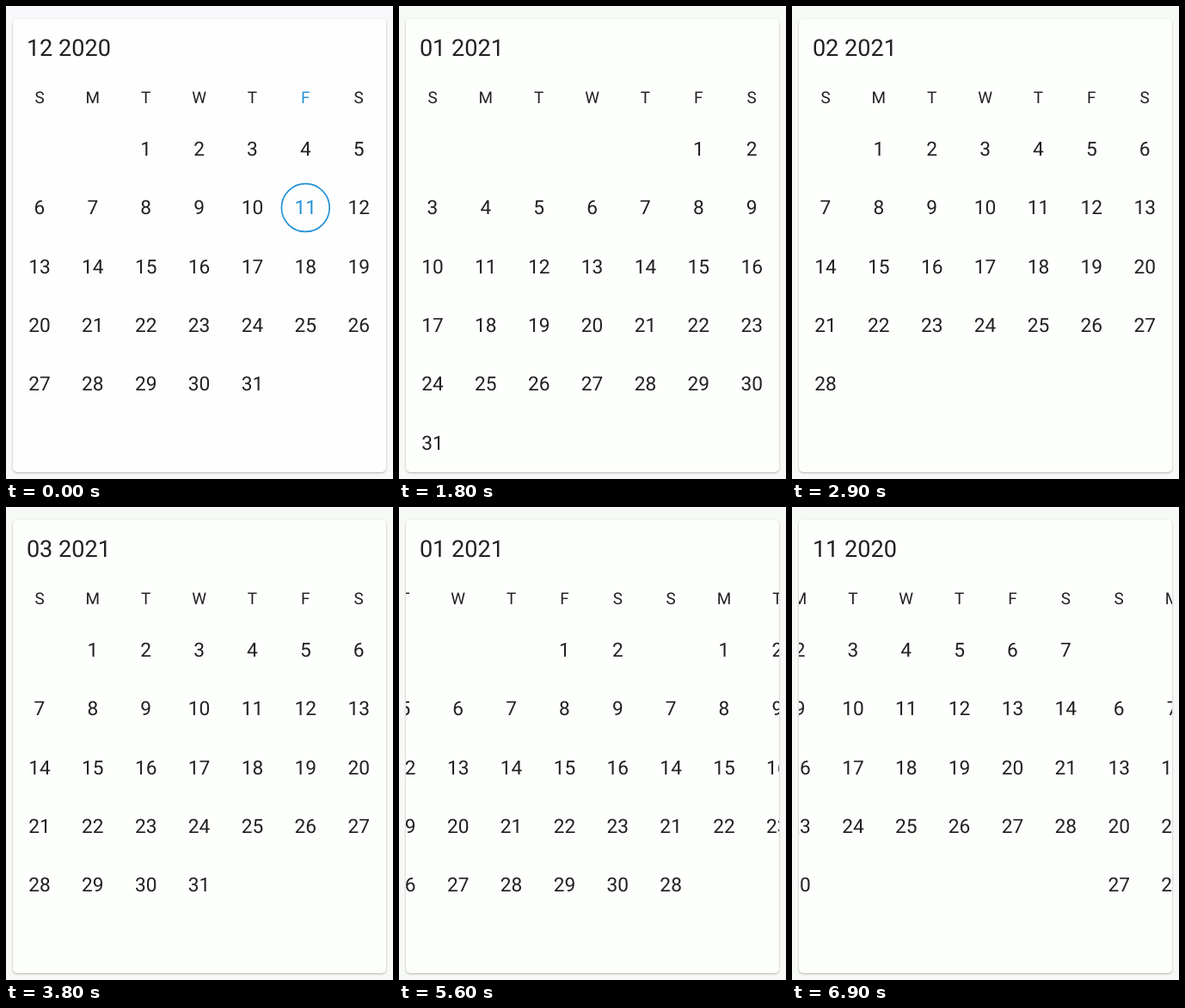
Animation of 450 by 550 pixels, one loop 7000 ms. Source, as an HTML page:

```html
<!DOCTYPE html>
<html lang="en">
<head>
<meta charset="utf-8">
<title>Month calendar</title>
<style>
  html, body { margin: 0; width: 100%; height: 100%; overflow: hidden; background: #f7f9f7; }
  svg { display: block; width: 450px; height: 550px; font-family: Roboto, sans-serif; fill: #212121; text-rendering: geometricPrecision; }
  .card { filter: drop-shadow(0 1px 1.2px rgba(0, 0, 0, .28)); }
  .title { font-size: 27.1px; }
  .head { font-size: 18.9px; text-anchor: middle; }
  .day { font-size: 22.7px; text-anchor: middle; }
  .today { fill: #2592d6; }
  .ring { fill: none; stroke: #2592d6; stroke-width: 1.7px; }
</style>
</head>
<body>
<svg id="stage" viewBox="0 0 450 550">
  <defs><clipPath id="clip"><rect x="8" y="15" width="434" height="527" rx="5"/></clipPath></defs>
  <rect id="back" width="450" height="550"/>
  <rect id="card" class="card" x="8" y="15" width="434" height="527" rx="5"/>
  <text id="title" class="title" x="23.9" y="58"></text>
  <g id="pages" clip-path="url(#clip)"></g>
</svg>
<script>
const $ = id => document.getElementById(id);
const LOOP = 7000, FRAME = 100;
const PAGE = 433, COL = PAGE / 7, ROW = 68.35;
const FIRST = { year: 2020, month: 10 };
const TODAY = { page: 1, day: 11, col: 5 };

// Swipes between page indexes; lead is how far into the move its first step is
const swipes = [
  { at: 1400, steps: 5, from: 1, to: 2, lead: 21 },
  { at: 2500, steps: 5, from: 2, to: 3, lead: 21 },
  { at: 3500, steps: 4, from: 3, to: 4, lead: 62 },
  { at: 4800, steps: 5, from: 4, to: 3, lead: 13 },
  { at: 5500, steps: 5, from: 3, to: 2, lead: 21 },
  { at: 6200, steps: 5, from: 2, to: 1, lead: 21 },
  { at: 6800, steps: 4, from: 1, to: 0, lead: 62 }
];

function add(parent, tag, attrs, text) {
  const el = document.createElementNS("http://www.w3.org/2000/svg", tag);
  for (const k in attrs) el.setAttribute(k, attrs[k]);
  if (text !== undefined) el.textContent = text;
  parent.appendChild(el);
  return el;
}

function buildPage(i) {
  const start = new Date(FIRST.year, FIRST.month + i, 1);
  const count = new Date(FIRST.year, FIRST.month + i + 1, 0).getDate();
  const g = add($("pages"), "g", {});
  const colX = c => 39 + c * COL;
  [..."SMTWTFS"].forEach((name, c) => {
    const on = i === TODAY.page && c === TODAY.col;
    add(g, "text", { class: on ? "head today" : "head", x: colX(c), y: 112.8 }, name);
  });
  for (let d = 1; d <= count; d++) {
    const cell = start.getDay() + d - 1;
    const x = colX(cell % 7), y = 174 + Math.floor(cell / 7) * ROW;
    const on = i === TODAY.page && d === TODAY.day;
    if (on) add(g, "circle", { class: "ring", cx: x, cy: y - 7.8, r: 27.9 });
    add(g, "text", { class: on ? "day today" : "day", x, y }, d);
  }
  const label = String(start.getMonth() + 1).padStart(2, "0") + " " + start.getFullYear();
  return { g, label };
}

const pages = [0, 1, 2, 3, 4].map(buildPage);

// Critically damped spring
function spring(ms) {
  const k = ms * 0.018;
  return 1 - (1 + k) * Math.exp(-k);
}

function position(t) {
  let pos = 1;
  for (const s of swipes) {
    if (t < s.at) break;
    const dt = t - s.at;
    const p = dt >= (s.steps - 1) * FRAME ? 1 : spring(dt + s.lead);
    pos = s.from + (s.to - s.from) * p;
  }
  return pos;
}

function mix(a, b, p) {
  return "rgb(" + a.map((v, i) => Math.round(v + (b[i] - v) * p)) + ")";
}

function render(time) {
  const t = Math.floor((time % LOOP) / FRAME) * FRAME;
  const pos = position(t);
  const tint = Math.min(1, t / 400);
  $("back").setAttribute("fill", mix([248, 247, 250], [247, 249, 247], tint));
  $("card").setAttribute("fill", mix([254, 254, 254], [253, 255, 252], tint));
  $("title").textContent = pages[Math.round(pos)].label;
  pages.forEach(({ g }, i) => {
    const off = i - pos;
    g.setAttribute("display", Math.abs(off) < 1 ? "inline" : "none");
    g.setAttribute("transform", `translate(${(off * PAGE).toFixed(2)} 0)`);
  });
}

const begin = performance.now();
function tick() {
  render(performance.now() - begin);
  requestAnimationFrame(tick);
}
tick();
</script>
</body>
</html>
```
